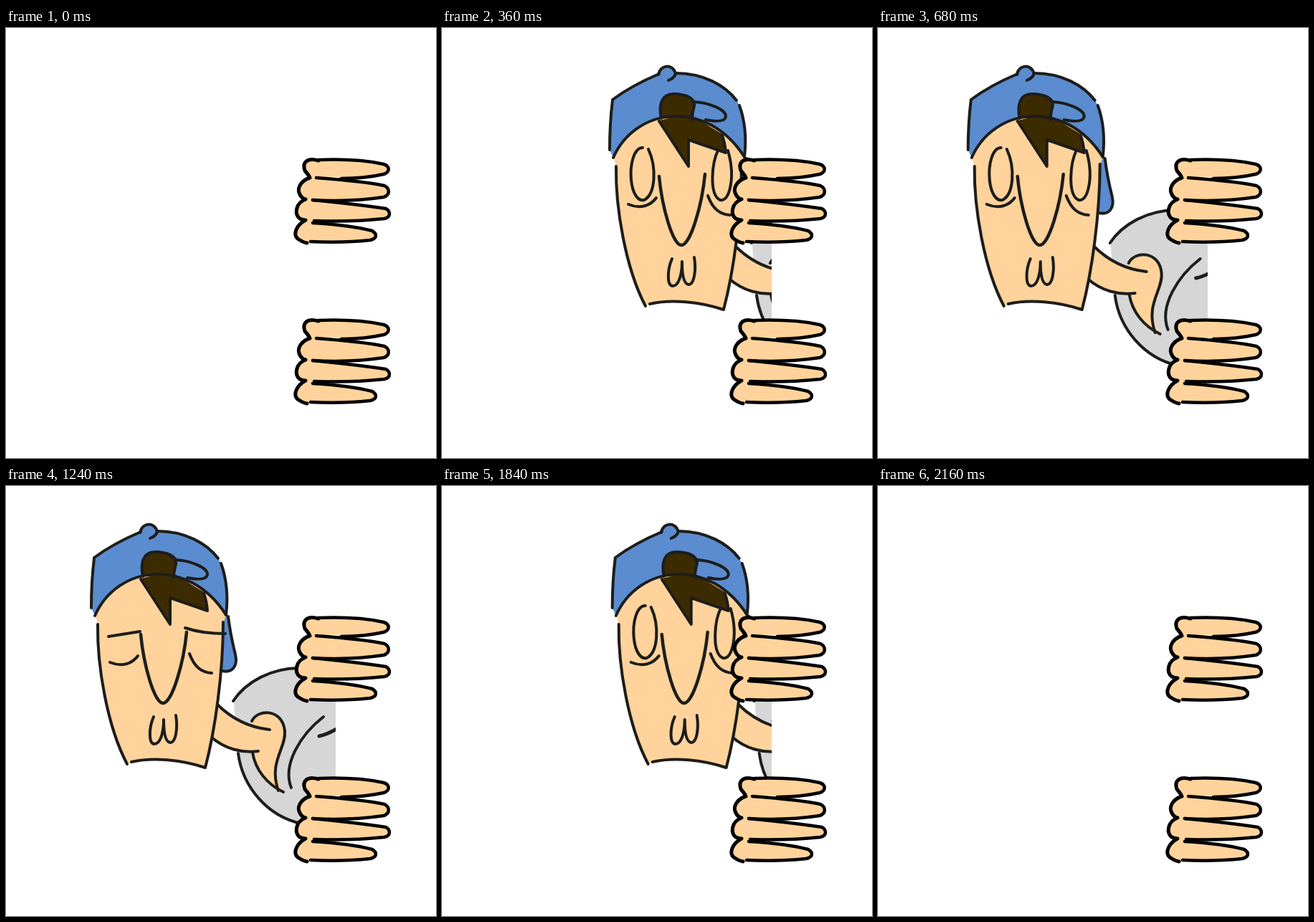
Write an HTML page with a canvas that moves like this. It is 600 by 600 pixels and loops after 2.36 s.

```html
<!DOCTYPE html>
<html lang="en">
<head>
<meta charset="utf-8">
<title>Peekaboo</title>
<style>
html, body { margin: 0; width: 100%; height: 100%; overflow: hidden; background: #fff; }
canvas { display: block; }
</style>
</head>
<body>
<canvas id="stage" width="600" height="600"></canvas>
<script>
const ctx = document.getElementById('stage').getContext('2d');
const LOOP = 2360, STEP = 40, HIDDEN = 345, EDGE = 460;
const SKIN = '#ffd39b', BLUE = '#5b8ccf', HAIR = '#3d2b00', SHIRT = '#d6d6d6', INK = '#1d1d1b';

// Cubic easing curve, solved by bisection
function bezier(x1, y1, x2, y2) {
  const at = (s, a, b) => 3 * (1 - s) * (1 - s) * s * a + 3 * (1 - s) * s * s * b + s * s * s;
  return u => {
    if (u <= 0) return 0;
    if (u >= 1) return 1;
    let lo = 0, hi = 1;
    for (let i = 0; i < 30; i++) {
      const mid = (lo + hi) / 2;
      if (at(mid, x1, x2) < u) lo = mid; else hi = mid;
    }
    return at(lo, y1, y2);
  };
}
const easeIn = bezier(0.4, 0.15, 0.117, 1);
const easeOut = bezier(0.25, 0, 0.76, 1);

function fill(color, d) {
  ctx.fillStyle = color;
  ctx.fill(new Path2D(d));
}
function line(d, width = 4, color = INK) {
  ctx.strokeStyle = color;
  ctx.lineWidth = width;
  ctx.stroke(new Path2D(d));
}

function drawBody() {
  fill(SHIRT, 'M412,254 C370,254 335,272 318,300 L322,372 C330,420 365,461 412,471 L480,471 L480,254 Z');
  line('M410,254 C370,254 335,273 317,300');
  line('M324,373 C330,420 365,461 412,471');
  fill(SKIN, 'M343,328 C352,310 386,311 389,342 C391,366 366,385 386,426 C364,417 348,395 344,371 Z');
  fill(SKIN, 'M285,296 L294,304 C315,325 340,337 368,340 L352,370 C330,373 305,367 286,350 L270,340 Z');
  line('M294,304 C315,325 340,337 368,340');
  line('M286,350 C305,367 330,373 352,370');
  line('M343,328 C352,310 386,311 389,342 C391,366 366,385 380,425');
  line('M344,372 C348,396 364,416 387,427');
  line('M443,322 C412,346 385,388 398,421');
  line('M437,349 Q452,346 472,332', 5);
}

function drawHead(blink) {
  fill(BLUE, 'M300,182 L310,182 Q313,207 320,235 C325,252 315,262 298,258 Z');
  line('M310,182 Q313,207 320,235 C324,252 315,261 302,258');

  fill(SKIN, 'M125,181 L128,193 C127,250 141,335 169,388 L175,385 C205,378 245,382 278,393 ' +
    'C292,340 303,260 304,190 L307,180 C255,98 155,110 125,181 Z');
  fill(HAIR, 'M188,129 L229,193 L229,156 L281,174 L276,148 L230,120 Z');
  line('M188,130 L229,193 L229,156 L281,174 Q280,161 276,150');

  fill(BLUE, 'M124,181 L119,170 C119,150 120,125 123,100 Q150,80 188,64 C190,50 208,50 211,63 ' +
    'C250,63 280,80 296,101 L300,108 C308,130 310,155 307,180 C255,98 155,110 124,181 Z');
  const bun = 'M191,126 C187,106 192,92 208,92 C225,92 239,98 237,109 Q234,120 234,128';
  fill(HAIR, bun);
  line(bun);
  line('M236,103 C258,104 282,114 281,124 C279,132 263,130 253,128');
  line('M123,100 Q150,80 188,64');
  line('M187,65 C190,50 208,50 211,64 Q209,70 201,73');
  line('M211,63 C250,63 280,80 296,101');
  line('M300,108 C308,130 310,155 307,180');
  line('M123,101 C120,125 119,150 119,170');
  line('M124,181 C155,110 255,98 307,180');

  line('M128,193 C127,250 141,335 169,388');
  line('M175,385 C205,378 245,382 278,393 C292,340 303,260 303,190');
  line('M188,207 C192,250 207,303 219,303 C232,303 248,246 252,204', 4.5);
  line('M206,322 C199,338 199,360 207,360 C215,360 220,345 220,326 C220,342 222,357 229,358 C237,358 240,338 237,320');
  line('M145,246 C162,253 176,248 184,237');
  line('M256,234 C263,253 273,260 287,261');

  if (blink) {
    line('M143,210 L187,203');
    line('M250,198 Q274,206 306,206');
  } else {
    line('M165,167 C153,167 147,190 149,212 C151,232 159,242 167,240 C183,232 185,195 173,169');
    line('M270,171 C261,190 259,228 270,238 C284,250 296,212 284,171');
  }
}

const fingers = [
  'M436,184 Q490,182 527,190 C536,193 536,201 527,204 Q500,210 468,210',
  'M433,209 Q500,214 528,220 C536,224 536,233 527,236 Q480,243 428,240',
  'M428,240 Q490,246 530,252 C537,256 537,264 528,266 Q480,271 430,269',
  'M428,272 Q480,275 511,283 C519,288 517,294 508,296 Q470,300 425,298'
];
const knuckles = [
  'M436,185 C420,180 413,188 417,199 Q423,206 424,209',
  'C414,212 406,221 409,230 Q412,238 418,239',
  'C404,244 402,260 410,266 Q414,268 418,268',
  'C405,275 400,288 407,294 Q414,299 420,300'
].join(' ');

function drawHand(y) {
  ctx.save();
  ctx.translate(0, y);
  fill(SKIN, knuckles + ' L425,298 L450,297 L450,185 Z');
  fingers.forEach(f => fill(SKIN, f));
  fill(SKIN, 'M430,186 L470,186 L470,208 L430,207 Z');
  line(knuckles, 5, '#000');
  fingers.forEach(f => line(f, 4.5, '#000'));
  // finger creases taper towards the knuckles
  line('M433,209 L470,211', 2.5, '#000');
  ctx.restore();
}

function offset(t) {
  return t < 1600
    ? HIDDEN * (1 - easeIn((t - 80) / 760))
    : HIDDEN * easeOut((t - 1640) / 520);
}

function draw(t) {
  ctx.fillStyle = '#fff';
  ctx.fillRect(0, 0, 600, 600);
  ctx.lineCap = ctx.lineJoin = 'round';

  const x = offset(t);
  if (x < HIDDEN) {
    ctx.save();
    ctx.beginPath();
    ctx.rect(0, 0, EDGE, 600);
    ctx.clip();
    ctx.translate(x, 0);
    drawBody();
    drawHead(t >= 1240 && t < 1360);
    ctx.restore();
  }
  drawHand(0);
  drawHand(224);
}

const start = performance.now();
function tick() {
  const t = (performance.now() - start) % LOOP;
  draw(Math.floor(t / STEP) * STEP);
  requestAnimationFrame(tick);
}
tick();
</script>
</body>
</html>
```
